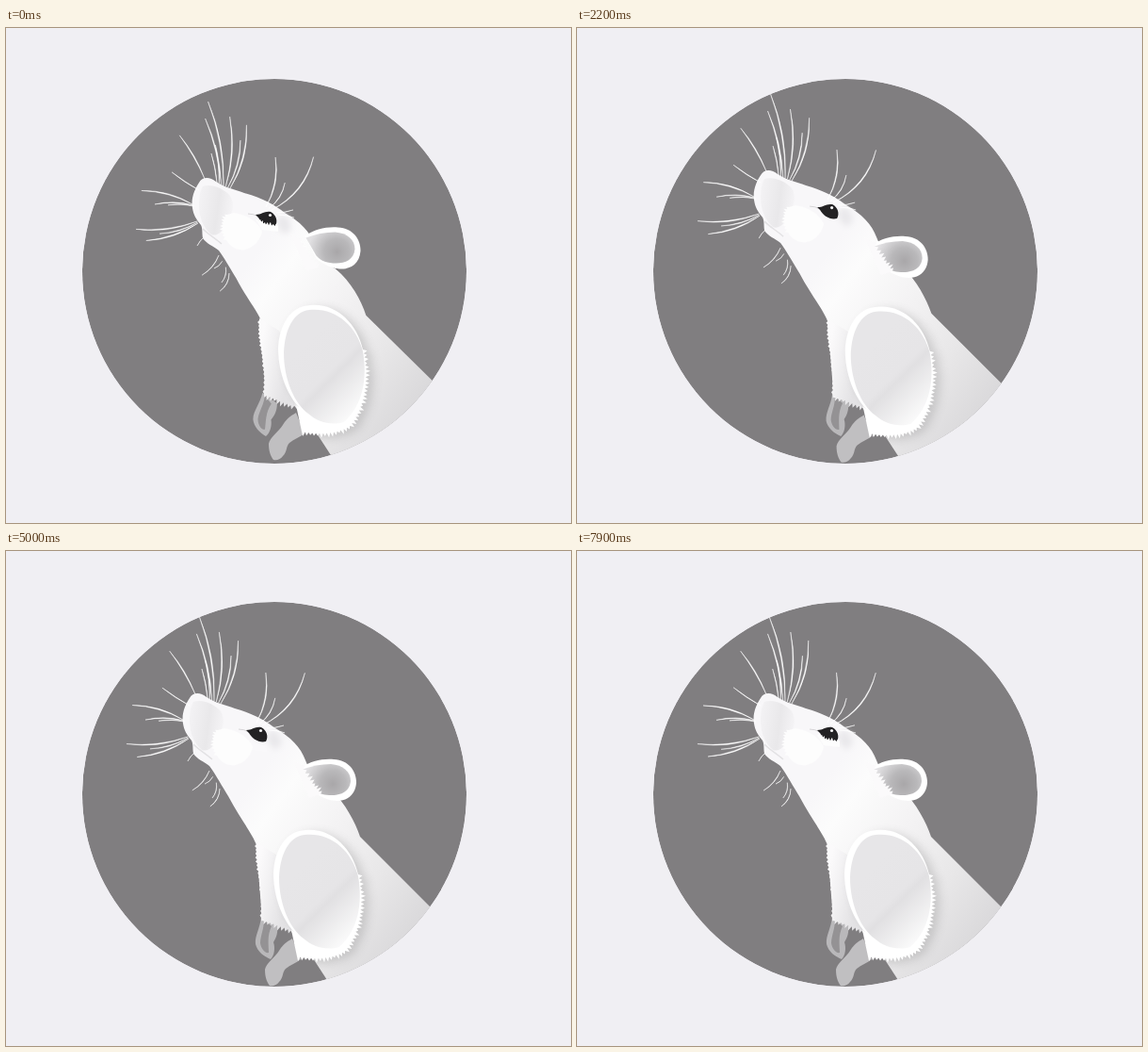
Animation of 600 by 525 pixels, one loop 8000 ms. Source, as an HTML page:

```html
<!DOCTYPE html>
<html lang="en">
<head>
<meta charset="utf-8">
<title>White rat</title>
<style>
  html, body { margin: 0; width: 100%; height: 100%; overflow: hidden; background: #f0eff3; }
  svg { display: block; width: 100%; height: 100%; }
</style>
</head>
<body>
<svg viewBox="0 0 600 525">
  <defs>
    <clipPath id="disc"><circle cx="285" cy="258" r="204"/></clipPath>
    <clipPath id="bodyClip"><path class="body"/></clipPath>
    <filter id="soft" x="-30%" y="-30%" width="160%" height="160%"><feGaussianBlur stdDeviation="5"/></filter>
    <filter id="haze" x="-50%" y="-50%" width="200%" height="200%"><feGaussianBlur stdDeviation="3"/></filter>
    <linearGradient id="coat" gradientUnits="userSpaceOnUse" x1="225" y1="240" x2="440" y2="400">
      <stop offset="0" stop-color="#f8f7f9"/><stop offset=".12" stop-color="#f8f7f9"/>
      <stop offset=".25" stop-color="#fcfcfc"/><stop offset=".5" stop-color="#f3f2f3"/>
      <stop offset=".75" stop-color="#e8e7e8"/><stop offset="1" stop-color="#d9d8da"/>
    </linearGradient>
    <linearGradient id="legFill" gradientUnits="userSpaceOnUse" x1="266" y1="345" x2="300" y2="352">
      <stop offset="0" stop-color="#fbfafb"/><stop offset="1" stop-color="#e4e3e5"/>
    </linearGradient>
    <linearGradient id="armFill" gradientUnits="userSpaceOnUse" x1="310" y1="340" x2="374" y2="405">
      <stop offset="0" stop-color="#e7e6e8"/><stop offset=".42" stop-color="#e6e5e7"/>
      <stop offset=".5" stop-color="#e1e0e2"/><stop offset="1" stop-color="#fcfcfc"/>
    </linearGradient>
    <radialGradient id="earFill" gradientUnits="userSpaceOnUse" cx="347" cy="247" r="31">
      <stop offset="0" stop-color="#a9a7a9"/><stop offset=".45" stop-color="#b9b8ba"/><stop offset="1" stop-color="#e2e1e3"/>
    </radialGradient>
    <linearGradient id="snoutFill" gradientUnits="userSpaceOnUse" x1="194" y1="180" x2="236" y2="186">
      <stop offset="0" stop-color="#f3f2f4"/><stop offset=".5" stop-color="#e9e8ea"/><stop offset="1" stop-color="#f9f8fa"/>
    </linearGradient>
  </defs>
  <rect width="600" height="525" fill="#f0eff3"/>
  <g clip-path="url(#disc)">
    <circle cx="285" cy="258" r="204" fill="#807e80"/>
    <g id="farPaw">
      <path fill="#b9b8ba" d="M271 388C270 400 264 408 265 417C267 425 274 430 281 433C285 429 286 421 284 415C287 410 289 405 288 397Z"/>
      <path fill="#949294" d="M274 391C274 401 270 408 270 416C271 422 275 427 279 426C279 418 277 408 282 398Z"/>
    </g>
    <path class="body" fill="url(#coat)"/>
    <path id="leg" fill="url(#legFill)"/>
    <path id="nearPaw" fill="#c0bfc1" d="M304 411C298 415 295 416 290 424C286 431 276 437 275 444C275 452 277 457 280 461C284 462 288 460 290 457C295 452 293 447 297 443C302 439 308 437 313 433Z"/>
    <g clip-path="url(#bodyClip)"><path id="armShade" fill="#777" opacity=".27" filter="url(#soft)"/></g>
    <g id="arm">
      <path id="armEdge" fill="#fff"/>
      <path fill="url(#armFill)" d="M317 301C344 298 367 317 374 345C379 374 374 402 354 420C340 424 326 420 316 411C302 401 290 376 290 346C291 322 300 303 317 301Z"/>
    </g>
    <g id="ear">
      <path fill="#fff" d="M313 230C323 223 336 220 348 221C364 222 372 233 372 246C371 259 362 265 352 265C342 265 332 260 325 254Z"/>
      <path fill="url(#earFill)" d="M314 232C324 228 334 226 345 226C358 227 366 234 366 244C365 255 356 259 346 259C337 259 330 257 325 251Z"/>
    </g>
    <path id="tuft" fill="#fbfafb"/>
    <g id="head">
      <path fill="url(#snoutFill)" d="M199 160C208 157 221 162 228 170C234 180 230 192 222 203C218 210 213 213 208 211C200 204 195 194 195 180C195 172 196 164 199 160Z"/>
      <path fill="none" stroke="#e3e2e4" stroke-width="1.5" d="M199 205C205 211 212 215 219 221"/>
      <ellipse cx="285" cy="200" rx="7" ry="10" transform="rotate(-20 285 200)" fill="#e9e8eb" filter="url(#haze)"/>
      <path id="cheek" fill="#fdfdfd"/>
      <path fill="none" stroke="#d6d5d7" d="M247 189Q253 189 258 192"/>
      <g id="eye">
        <path fill="#232224" d="M255 190C262 190 264 186 271 187C277 190 279 197 276 202C269 204 261 199 258 193Z"/>
        <circle cx="270.5" cy="190.5" r="1.6" fill="#f4f4f5"/>
      </g>
      <path id="lashes" fill="#fdfdfd"/>
      <path id="whiskers" fill="#fff" stroke="#fff" stroke-width=".45"/>
    </g>
  </g>
</svg>
<script>
const LOOP = 8000;
const $ = id => document.getElementById(id);
const setPath = (id, d) => $(id).setAttribute('d', d);
const move = (id, x, y) => $(id).setAttribute('transform', `translate(${x.toFixed(2)} ${y.toFixed(2)})`);
const noise = n => { const v = Math.sin(n * 127.1 + 3.7) * 43758.5453; return v - Math.floor(v); };
const clamp = u => Math.min(1, Math.max(0, u));
const mix = (a, b, u) => a + (b - a) * u;

// 0 before start, 1 after end, smooth between
const ease = (t, start, end) => (1 - Math.cos(Math.PI * clamp((t - start) / (end - start)))) / 2;

// Jagged edge along a cubic; the sign of height picks the side
function fur([x0, y0, x1, y1, x2, y2, x3, y3], count, height) {
  let d = '';
  for (let i = 0; i <= count * 2; i++) {
    const u = i / (count * 2), v = 1 - u;
    const at = (a, b, c, e) => v * v * v * a + 3 * v * v * u * b + 3 * v * u * u * c + u * u * u * e;
    const slope = (a, b, c, e) => v * v * (b - a) + 2 * v * u * (c - b) + u * u * (e - c);
    const dx = slope(x0, x1, x2, x3), dy = slope(y0, y1, y2, y3);
    const k = (i % 2 ? height * (.5 + .7 * noise(i + count)) : 0) / (Math.hypot(dx, dy) || 1);
    d += `L${(at(x0, x1, x2, x3) - dy * k).toFixed(1)} ${(at(y0, y1, y2, y3) + dx * k).toFixed(1)}`;
  }
  return d;
}

const BODY = 'M188 183C186 172 191 162 195 156C198 150 206 149 213 155C222 161 232 163 243 167' +
  'C262 172 276 180 286 188C302 197 313 208 318 222C324 238 332 243 341 249C358 264 370 285 376 303' +
  'L462 389L352 472L326 432L300 400L272 392L266 312C262 300 248 283 236 260' +
  'C228 247 222 236 216 228C210 223 203 221 199 215C198 209 199 205 197 201C192 195 189 190 188 183Z';

// The neck bends: points follow the head above and the torso below
function bodyPath(head, torso) {
  return BODY.replace(/(\d+) (\d+)/g, (_, x, y) => {
    const w = clamp((345 - y) / 110);
    const dx = mix(4 * torso, 10 * head, w), dy = mix(-2 * torso, 8 * head, w);
    return `${(+x + dx).toFixed(2)} ${(+y + dy).toFixed(2)}`;
  });
}

// Each fan runs from its first root to its last; tips are x y pairs
const fan = (from, to, bends, tips) => ({ from, to, bends, tips: tips.split(',').map(p => p.trim().split(' ').map(Number)) });
const WHISKERS = [
  fan([214, 156], [228, 162], [.05, .15], '208 125, 212 116, 202 88, 205 70, 227 86, 239 111, 246 95'),
  fan([201, 152], [195, 164], [.07, -.04], '174 106, 166 145'),
  fan([188, 179], [190, 181], [.13, .1], '134 164, 148 179, 162 180'),
  fan([193, 197], [194, 199], [-.12, -.13], '128 205, 153 210, 139 218'),
  fan([200, 214], [200, 214], [.1, .1], '193 223'),
  fan([216, 233], [227, 252], [-.17, -.25], '198 254, 211 247, 219 262, 217 271'),
  fan([266, 182], [272, 185], [.17, .23], '276 129, 286 156, 317 129'),
  fan([277, 188], [279, 190], [.08, -.08], '295 185, 296 193')
];

function whisker(x, y, tx, ty, bend, angle) {
  const c = Math.cos(angle), s = Math.sin(angle);
  const dx = (tx - x) * c - (ty - y) * s, dy = (tx - x) * s + (ty - y) * c;
  const half = Math.min(1 / Math.hypot(dx, dy), 1 / 60);
  const side = k => `${(x + dx / 2 - dy * k).toFixed(2)} ${(y + dy / 2 + dx * k).toFixed(2)}`;
  return `M${x} ${y}Q${side(bend + half)} ${(x + dx).toFixed(2)} ${(y + dy).toFixed(2)}Q${side(bend - half)} ${x} ${y}Z`;
}

function whiskerPath(t) {
  let n = 0;
  return WHISKERS.map(({ from, to, bends, tips }) => tips.map(([tx, ty], i) => {
    const u = i / Math.max(1, tips.length - 1);
    const angle = .009 * Math.sin(t * Math.PI * 2 / 400 + 1.9 * n++);
    return whisker(mix(from[0], to[0], u), mix(from[1], to[1], u), tx, ty, mix(...bends, u), angle);
  }).join('')).join('');
}

const armOutline = 'M318 296C345 293 368 315 374 343' +
  fur([374, 343, 380, 372, 377, 403, 360, 424], 21, -4.5) +
  fur([360, 424, 346, 433, 326, 433, 309, 430], 14, -4.5) +
  'L303 402L316 412C298 402 284 372 284 342C285 318 296 297 318 296Z';
setPath('armEdge', armOutline);
setPath('armShade', armOutline);
setPath('leg', 'M266 309' + fur([266, 311, 265, 335, 274, 360, 271, 389], 18, 1.6) +
  fur([271, 389, 280, 393, 292, 399, 303, 402], 9, 4.5) + 'L310 360L287 322Z');
setPath('cheek', 'M232 188' + fur([225, 190, 219, 196, 219, 207, 224, 217], 9, 3) +
  'C236 236 258 226 262 208C258 198 246 190 232 188Z');
setPath('tuft', 'M305 222L322 262' + fur([334, 258, 328, 250, 320, 242, 313, 227], 9, 4.5) + 'Z');
setPath('lashes', 'M255 195' + fur([255, 196, 262, 200, 269, 202, 279, 202], 8, -3.2) + 'L279 208L262 206Z');

function draw(t) {
  const head = 1 - ease(t, 900, 2300);
  const torso = 1 - ease(t, 1000, 2600);
  const earLift = 1 - ease(t, 900, 1850);

  const body = bodyPath(head, torso);
  document.querySelectorAll('.body').forEach(el => el.setAttribute('d', body));

  move('head', 10 * head, 8 * head);
  move('ear', 4.5 * torso, -9.5 * earLift);
  move('tuft', 4 * torso - 7 * earLift, -4 * earLift);
  move('leg', 3 * torso, -torso);
  move('arm', 5 * torso, -2 * torso);
  move('armShade', 5 * torso + 6, 3 - 2 * torso);
  move('nearPaw', 4 * torso, -3 * torso);
  $('farPaw').setAttribute('transform', `translate(${torso.toFixed(2)} 0) rotate(${(8 * torso).toFixed(2)} 278 390)`);

  const blink = ease(t, 3000, 3200) - ease(t, 3200, 3400);
  $('eye').setAttribute('transform',
    `translate(267 195) rotate(32) scale(1 ${(1 - .95 * blink).toFixed(3)}) rotate(-32) translate(-267 -195)`);

  const squint = 1 - ease(t, 900, 1300) + ease(t, 4900, 5300);
  move('lashes', -2 * (1 - squint), 6 * (1 - squint));
  $('lashes').setAttribute('opacity', squint.toFixed(3));
  setPath('whiskers', whiskerPath(t));
}

const began = performance.now();
function tick() {
  draw((performance.now() - began) % LOOP);
  requestAnimationFrame(tick);
}
tick();
</script>
</body>
</html>
```
